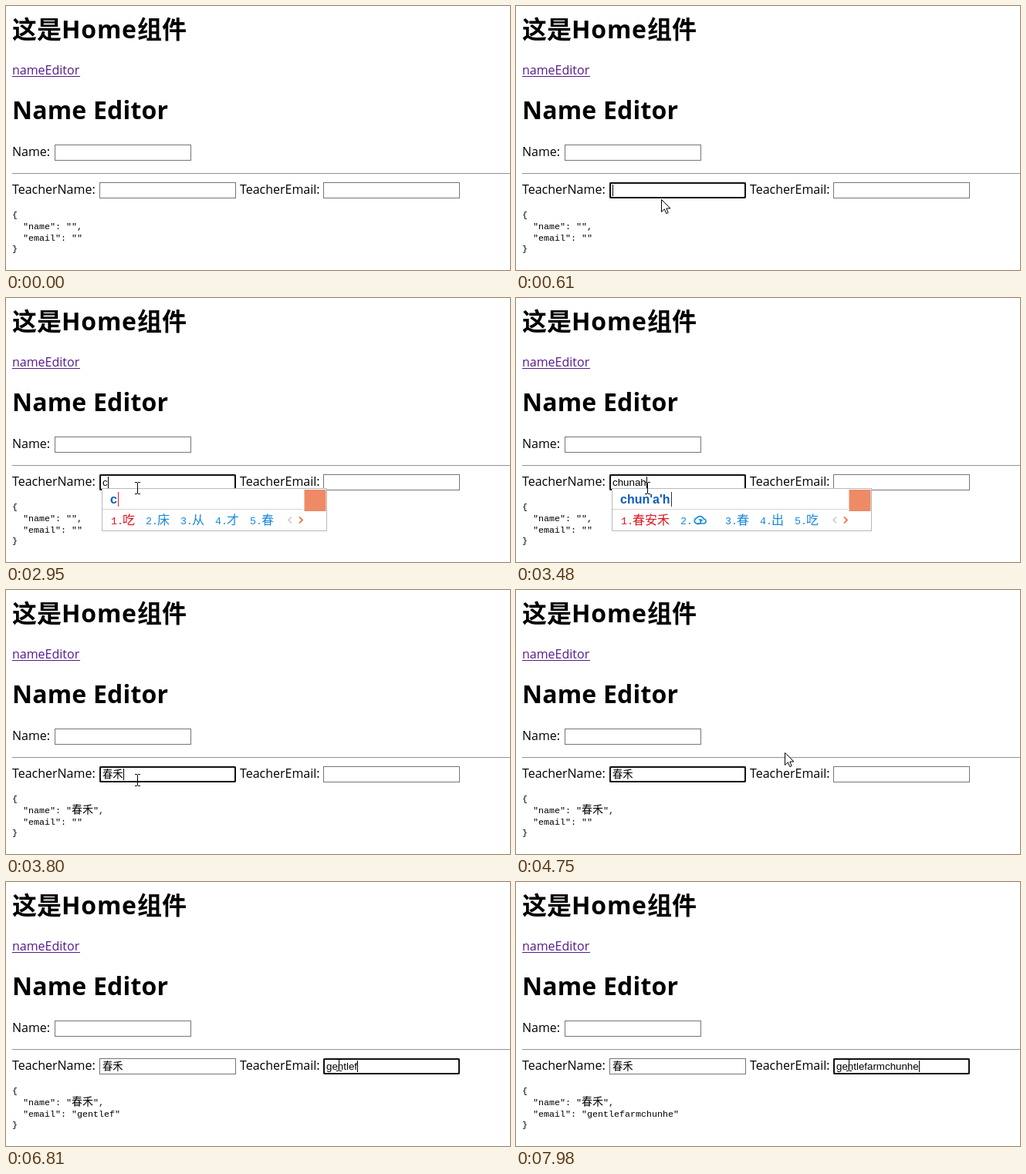
Write an HTML page that moves like this. It is 653 by 343 pixels and loops after 8 s.

```html
<!DOCTYPE html>
<html lang="zh">
<head>
<meta charset="utf-8">
<title>Name Editor</title>
<style>
  html, body { margin: 0; width: 100%; height: 100%; overflow: hidden; background: #fff; }
  svg { display: block; width: 653px; height: 343px; }
  text { white-space: pre; }
  .page { font: 16px "Open Sans", "Noto Sans CJK SC", "Noto Sans CJK", sans-serif; }
  .page .h { font-size: 32px; font-weight: 700; }
  .link { fill: #551a8b; }
  .box { fill: #fff; stroke: #767676; }
  .ring { fill: none; stroke: #101010; stroke-width: 2; }
  .field { font: 13.333px "Liberation Sans", "Noto Sans CJK SC", "Noto Sans CJK", Arial, sans-serif; }
  .pre { font: 11.667px "Liberation Mono", "Noto Sans CJK SC", "Noto Sans CJK", monospace; }
  .wide { font-size: 14px; }
  .comp { font: bold 16px "Liberation Sans", Arial, sans-serif; fill: #0a5cbe; }
  .cand { font: 13.333px "Liberation Mono", monospace; fill: #1488dc; }
  .cand .zh { font: 16px "Noto Sans CJK SC", "Noto Sans CJK", sans-serif; }
  .cand .first { fill: #e0141e; }
  .line { fill: none; stroke-width: 1.6; }
</style>
</head>
<body>
<svg viewBox="0 0 653 343">
  <rect width="653" height="343" fill="#fff"/>
  <g class="page">
    <text class="h" y="42"><tspan x="8">这是</tspan><tspan x="72" letter-spacing=".8">Home</tspan><tspan x="170">组件</tspan></text>
    <text class="link" x="8" y="89">nameEditor</text>
    <rect class="link" x="8" y="91" width="88" height="1"/>
    <text class="h" x="8" y="147" letter-spacing=".2">Name Editor</text>
    <text x="8" y="195">Name:</text>
    <text x="8" y="244">TeacherName:</text>
    <text x="303" y="244">TeacherEmail:</text>
  </g>
  <rect x="8" y="217" width="645" height="1" fill="#9a9a9a"/>
  <rect x="8" y="218" width="645" height="1" fill="#eee"/>
  <rect class="box" x="63.5" y="180.5" width="176" height="20"/>
  <rect class="box" x="121.5" y="229.5" width="176" height="20"/>
  <rect class="box" x="411.5" y="229.5" width="176" height="20"/>
  <rect class="ring" id="ring" y="230" width="175" height="19" rx="2"/>
  <text class="field" id="nameField" x="125" y="244"></text>
  <text class="field" id="mailField" x="415" y="244"></text>
  <rect id="caret" y="232" width="1" height="15"/>
  <g class="pre">
    <text x="8" y="275">{</text>
    <text x="22" y="290">"name": "<tspan id="nameOut"></tspan>",</text>
    <text x="22" y="304.7">"email": "<tspan id="mailOut"></tspan>"</text>
    <text x="8" y="319">}</text>
  </g>
  <g id="popup"></g>
  <g id="pointer">
    <path id="beam" d="M-3 -7.5H0M1 -7.5H4M.5 -7V7M-3 7.5H0M1 7.5H4" fill="none" stroke="#000"/>
    <path id="arrow" d="M.5 .5V16.5L4.3 12.9L6.8 18.6L9.2 17.5L6.8 12H12Z" fill="#fff" stroke="#000"/>
  </g>
</svg>
<script>
const LOOP = 8000;
const NAME = '春禾';
const MAIL = 'gentlefarmchunhe';
const CLOUD = 'cloud';
const $ = id => document.getElementById(id);

// Each step keeps the fields it does not mention.
const steps = [];
let last = { focus: '', caret: false, name: '', mail: '', comp: '', cands: '' };
const at = (time, change) => steps.push(last = { ...last, time, ...change });
const type = (time, key, text) => at(time, { [key]: text, caret: true });
const compose = (time, comp, cands) => at(time, { comp, cands, caret: true });

at(0, {});
at(610, { focus: 'name', caret: true });
at(1160, { caret: false });
type(1450, 'name', 'c');
type(1550, 'name', 'ch');
type(1640, 'name', 'chu');
type(1720, 'name', 'chun');
at(2190, { caret: false });
['chu', 'ch', 'c', ''].forEach((s, i) => type(2480 + 80 * i, 'name', s));
compose(2950, 'c', '吃 床 从 才 春');
compose(3100, 'ch', '吃 春天 出 长城 出来');
compose(3250, 'chu', '出 处 初 除 楚');
compose(3330, 'chun', '春 纯 唇 春天 出');
compose(3400, "chun'a", '春啊 春 纯 唇 出');
compose(3480, "chun'a'h", '春安禾 cloud 春 出 吃');
compose(3590, "chun'he", '春禾 cloud 春和景明 纯核心 春河边');
at(3800, { name: NAME, comp: '' });
at(4260, { caret: false });
at(4890, { focus: 'mail', caret: true });
at(5420, { caret: false });
for (let n = 1; n <= 6; n++) type(5800 + 128 * (n - 1), 'mail', MAIL.slice(0, n));
[7, 8, 9, 10, 11, 13, 14, 15].forEach((n, i) => type(6810 + 143 * i, 'mail', MAIL.slice(0, n)));
type(7980, 'mail', MAIL);

function popupMarkup(comp, cands) {
  let x = 136, row = '';
  cands.split(' ').forEach((word, i) => {
    const cls = i ? '' : 'first';
    row += `<text class="${cls}" x="${x}" y="294">${i + 1}.</text>`;
    if (word === CLOUD) {
      row += `<path class="line" stroke="#1488dc" transform="translate(${x + 16} 282)"
        d="M5 11H14a3 3 0 0 0 0 -6A5 5 0 0 0 5 4A3.6 3.6 0 0 0 5 11a3 3 0 0 0 4 -5a2 2 0 0 1 3 2"/>`;
      x += 58;
    } else {
      row += `<text class="zh ${cls}" x="${x + 15}" y="294">${word}</text>`;
      x += 29 + 16 * word.length;
    }
  });
  const right = x + 54.5;
  return `<rect x="124.5" y="247.5" width="${right - 124.5}" height="55" fill="#fff" stroke="#b4b9c2"/>
    <path d="M125 274.5H${right - 31}" stroke="#d4d4d4"/>
    <rect x="${right - 29}" y="249" width="28" height="28" fill="#ee8a66"/>
    <text class="comp" x="135" y="267">${comp}</text>
    <rect class="mark" y="252" width="1" height="19" fill="${comp.length > 1 ? '#333' : '#e02020'}"/>
    <g class="cand">${row}</g>
    <path class="line" stroke="#c8c8c8" d="M${right - 45.5} 284.5l-4 4l4 4"/>
    <path class="line" stroke="#e8602c" d="M${right - 35.5} 284.5l4 4l-4 4"/>`;
}

function render(s) {
  const composing = s.comp !== '';
  const isName = s.focus === 'name';
  $('nameField').textContent = composing ? s.comp.replace(/'/g, '') : s.name;
  $('mailField').textContent = s.mail;
  $('nameOut').textContent = s.name;
  $('nameOut').setAttribute('class', s.name === NAME ? 'wide' : '');
  $('mailOut').textContent = s.mail;
  $('ring').setAttribute('x', isName ? 122 : 412);
  $('ring').style.display = s.focus ? '' : 'none';
  const width = $(isName ? 'nameField' : 'mailField').getComputedTextLength();
  $('caret').setAttribute('x', Math.round((isName ? 125 : 415) + width));
  $('caret').style.display = s.caret ? '' : 'none';
  const popup = $('popup');
  popup.innerHTML = composing ? popupMarkup(s.comp, s.cands) : '';
  if (composing) {
    const end = 136 + popup.querySelector('.comp').getComputedTextLength();
    popup.querySelector('.mark').setAttribute('x', Math.round(end));
  }
}

// The pointer advances in small jumps, as a screen recording does.
const progress = (t, start, gap, count) =>
  Math.max(0, Math.min(1, Math.floor((t - start) / gap) / count));

function movePointer(t) {
  let x, y, p;
  if (t < 4340) {
    p = progress(t, 150, 78, 7);
    p = p * (2 - p);
    x = 394 - 224 * p;
    y = 293 - 46 * p;
  } else {
    p = progress(t, 4260, 90, 8);
    p = p * p * (3 - 2 * p);
    x = 170 + 261 * p;
    y = 247 - 9 * p - 136 * p * (1 - p);
  }
  const overField = y > 228 && y < 250 && (x < 298 || x > 411);
  $('pointer').setAttribute('transform', `translate(${Math.round(x)} ${Math.round(y)})`);
  $('pointer').style.display = t < 150 ? 'none' : '';
  $('beam').style.display = overField ? '' : 'none';
  $('arrow').style.display = overField ? 'none' : '';
}

const start = performance.now();
let shown = null;
function tick() {
  const t = (performance.now() - start) % LOOP;
  const step = steps.findLast(s => s.time <= t);
  if (step !== shown) render(shown = step);
  movePointer(t);
  requestAnimationFrame(tick);
}
tick();
</script>
</body>
</html>
```
